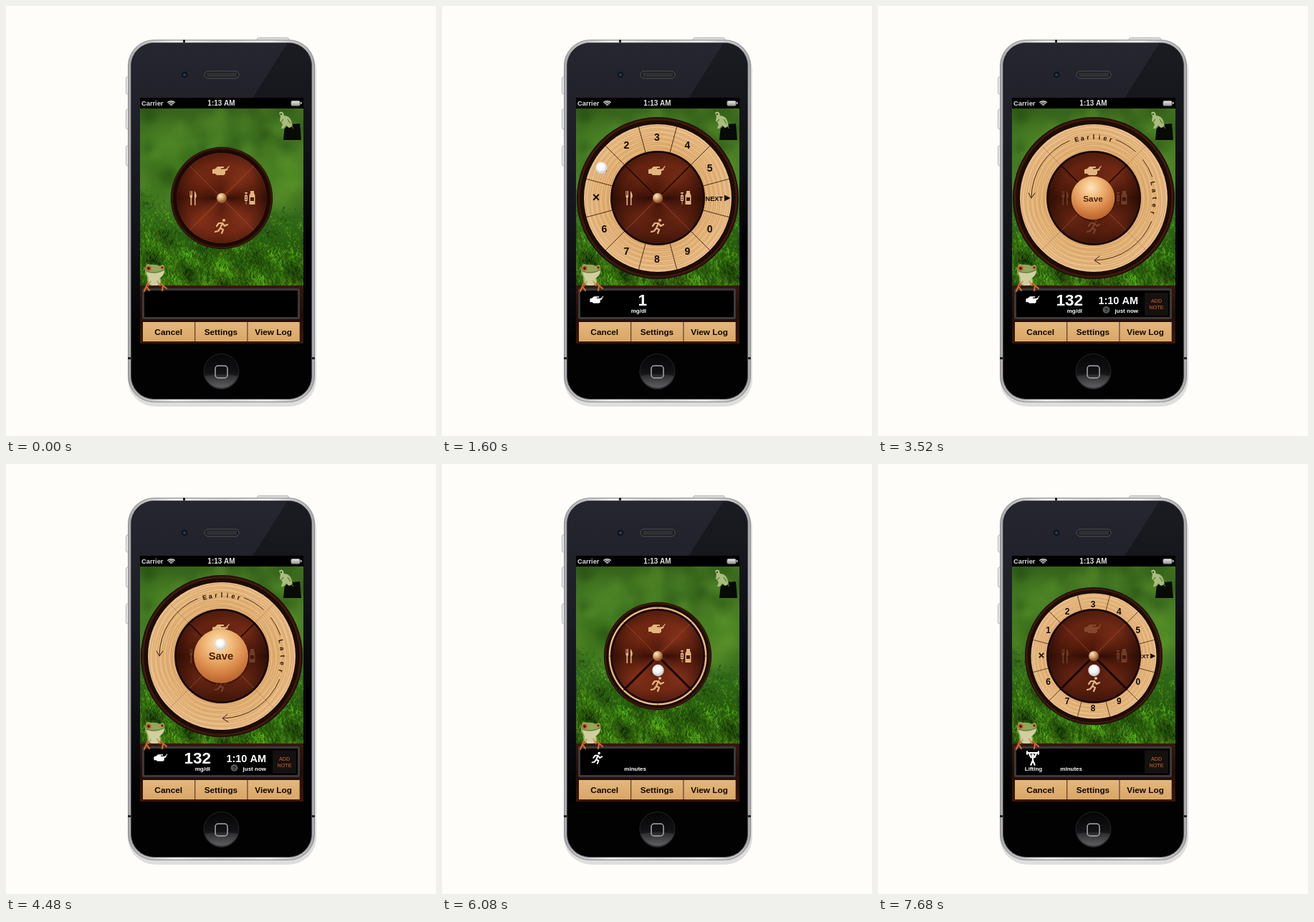
An HTML page with a canvas for the animation above (8 s loop, 600x600 px).

```html
<!DOCTYPE html>
<html lang="en">
<head>
<meta charset="utf-8">
<title>Wheel logger</title>
<style>
html, body { margin: 0; overflow: hidden; background: #fefdf9; }
canvas { display: block; width: 600px; height: 600px; }
</style>
</head>
<body>
<canvas id="stage" width="600" height="600"></canvas>
<script>
const stage = document.getElementById('stage').getContext('2d');
const LOOP = 8000, TAU = Math.PI * 2, CX = 301, CY = 268;
const DISC = 65, WOOD = 103, BARK = 113, CLOSED = 0.63;
const TAN = '#e2b67e';
const rad = deg => deg * Math.PI / 180;
let c = stage;

let seed = 7;
const rnd = (a = 0, b = 1) => {
  seed = (seed * 16807) % 2147483647;
  return a + (b - a) * seed / 2147483647;
};

// Drawing helpers
function gradient(g, stops) {
  stops.forEach((s, i) => g.addColorStop(i / (stops.length - 1), s));
  return g;
}
const linear = (x0, y0, x1, y1, ...stops) => gradient(c.createLinearGradient(x0, y0, x1, y1), stops);
const radial = (x, y, r, ...stops) => gradient(c.createRadialGradient(x, y, 0, x, y, r), stops);
function paint(fill, stroke, width) {
  if (fill) { c.fillStyle = fill; c.fill(); }
  if (stroke) { c.strokeStyle = stroke; c.lineWidth = width; c.stroke(); }
}
function circle(x, y, r, fill, stroke, width = 1) {
  c.beginPath();
  c.arc(x, y, r, 0, TAU);
  paint(fill, stroke, width);
}
function box(x, y, w, h, r, fill, stroke, width = 1) {
  c.beginPath();
  c.roundRect(x, y, w, h, r);
  paint(fill, stroke, width);
}
function shape(d, fill) {
  c.fillStyle = fill;
  c.fill(new Path2D(d), 'evenodd');
}
function line(d, color, width) {
  c.strokeStyle = color;
  c.lineWidth = width;
  c.stroke(new Path2D(d));
}
function text(str, x, y, size, color, align = 'center', weight = 'bold') {
  c.font = `${weight} ${size}px "Liberation Sans", Arial, sans-serif`;
  c.textAlign = align;
  c.fillStyle = color;
  c.fillText(str, x, y);
}
function at(x, y, scale, draw) {
  c.save();
  c.translate(x, y);
  c.scale(scale, scale);
  draw();
  c.restore();
}
function spoke(deg, r0, r1, color, width) {
  const x = Math.cos(rad(deg)), y = Math.sin(rad(deg));
  line(`M${x * r0} ${y * r0}L${x * r1} ${y * r1}`, color, width);
}

// Icons, centred on the origin
const head = (x, y) => `M${x - 1} ${y}a1 1 0 1 1 2 0a1 1 0 1 1-2 0`;
const solid = {
  hand: 'M-12-2L-8-3-5-6H4V-4H0V-2.500H7L11-7 12-6.500 9-2.500 10-1.500 7 0H6V4L4 6H-6L-8 4H-12Z',
  fork: 'M-4.500-10v7q0 2 1 3V10h1.600V0q1-1 1-3v-7h-.8v6h-.7v-6h-.7v6h-.7v-6ZM2-10q3.500 4 2.500 9L3.500 0V10H2Z',
  meds: 'M1-10h5v3l1.500 3V9H-.5V-4L1-7ZM1-1v5h5v-5ZM-7-8h4v1.500h-1.500V-4H-3V4h-1.500v5h-.8V4H-7V-4h1.500v-2.500H-7ZM-6-2v1.200h2V-2ZM-6 1v1.200h2V1Z'
};
const limbs = {
  run: head(4, -8) + 'M2-4L-1 3 3 5 1 10M-1 3L-4 7-8 8M2-4L5 0 9-2M2-4L-3-4-6 0',
  swim: head(2, -2) + 'M-8-1L-2-4 1 2 8 2M-8 4H8',
  bike: head(4, -8) + 'M2-6L-3-3 1 0 0 4M2-5L6-3M-9 4a3 3 0 1 1 6 0a3 3 0 1 1-6 0M3 4a3 3 0 1 1 6 0a3 3 0 1 1-6 0',
  ski: head(2, -8) + 'M1-5L0 2 5 8M0 2L-1 9M-6-6L1-4 6-5',
  lift: head(0, -5) + 'M-9-9H9M-9-11V-7M9-11V-7M-6-9L-3-2H3L6-9M0-2V3L-3 10M0 3L3 10',
  walk: head(1, -8) + 'M0-5L-1 2 4 9M-1 2L-5 9M0-4L5 0M0-4L-4 1',
  golf: head(0, -7) + 'M0-4L1 3 4 9M1 3L-3 9M0-4L-5-2-7-9M0-3L-5-2',
  climb: head(2, -7) + 'M1-4L-1 3 3 9M-1 3L-3 9M1-4L-4-2-6-8M1-3L5 0'
};
const activities = ['ski', 'run', 'lift', 'walk', 'golf', 'climb', 'swim', 'bike'];
function icon(name, x, y, color, scale = 1, width = 2.2) {
  at(x, y, scale, () => {
    c.lineCap = c.lineJoin = 'round';
    if (solid[name]) shape(solid[name], color);
    else line(limbs[name], color, width);
  });
}

// Static scenery
function moss() {
  c.save();
  c.beginPath();
  c.rect(187, 143, 228, 247);
  c.clip();
  c.fillStyle = linear(0, 143, 0, 390, '#35621a', '#447c22', '#457f1f', '#31691a', '#245a0d', '#1f5009');
  c.fillRect(187, 143, 228, 247);
  for (let i = 0; i < 60; i++) {
    const x = rnd(180, 420), y = rnd(140, 280), r = rnd(12, 34);
    const tint = rnd() < 0.5 ? '20,50,8' : '110,165,50';
    circle(x, y, r, radial(x, y, r, `rgba(${tint},.25)`, `rgba(${tint},0)`));
  }
  // Blades run from the far edge of the mound to the front
  const count = 6500;
  for (let i = 0; i < count; i++) {
    const depth = Math.sqrt(i / count), x = rnd(185, 417);
    const y = 246 + (x - 187) * 0.17 + 5 * Math.sin(x / 17) + depth * 145;
    const len = 1.5 + depth * 4;
    const clump = Math.sin(x / 11 + y / 15) + Math.sin(y / 7 - x / 23) + Math.sin(x / 6 - y / 10);
    line(`M${x} ${y}q${rnd(-2, 2)} ${-len / 2} ${rnd(-3, 3)} ${-len}`,
      `hsla(${rnd(86, 102)},${rnd(65, 85)}%,${rnd(14, 38) + clump * 5}%,.75)`, 1);
  }
  c.restore();
}
function perchedFrog() {
  shape('M389 167L397 165 410 164 412 187H387Z', '#080a06');
  shape('M381 149q3-3 6 0l1 4q7 0 10 7l2 8-5 2-4-3-3 4h-4l2-6-4-5 1-6Z', '#a9bd7d');
  line('M387 158l-4 5M392 167l-5 5M398 167l3 4M393 158l4 6', '#55702f', 1.2);
  circle(384, 151, 1.1, '#1b2509');
}
function cornerFrog() {
  line('M199 384L196 391 193 398M196 391L200 397M214 384L219 390 224 394M219 390L218 397', '#d2692e', 2.2);
  shape('M197 378Q192 372 195 364Q196 358 202 361Q210 360 215 363Q220 358 221 365Q223 373 215 379Q219 386 212 390H202Q196 387 197 378Z', '#93a65a');
  shape('M196 371Q208 376 221 369Q220 377 214 380Q217 387 211 390H203Q198 387 199 380Z', '#cfcf9f');
  line('M196 370Q208 375 221 368', '#62733a', 1);
  line('M202 384l-3 6M211 384l4 6', '#cf8d55', 1.6);
  for (const [x, y, r] of [[199, 366, 3.6], [218, 365, 2.2]]) {
    circle(x, y, r, '#cf5424');
    circle(x, y, r / 2.2, '#240a05');
  }
}
function phone() {
  c.fillStyle = '#fefdf9';
  c.fillRect(0, 0, 600, 600);
  box(350.5, 44.5, 44, 6, 2, '#e4e4e4', '#aaa');
  for (const [y, h] of [[99, 24], [144, 28], [195, 28]]) box(167.5, y, 6, h, 2, '#ececec', '#b5b5b5');
  box(170, 52, 263, 507, 38, '#dededd');
  box(170.5, 47.5, 260, 505, 36, linear(170, 0, 431, 0, '#a9a9ab', '#e6e6e7', '#d0d0d2', '#e6e6e7', '#a9a9ab'), '#8c8c90');
  c.fillStyle = '#222';
  c.fillRect(247, 47, 3, 5);
  c.fillRect(170, 490, 5, 3);
  c.fillRect(426, 490, 5, 3);
  box(174.5, 51.5, 252, 497, 32, '#020203', '#45464b');
  c.save();
  c.beginPath();
  c.roundRect(175, 52, 251, 496, 32);
  c.clip();
  shape('M175 52H393L345 128H187V471H175Z', linear(0, 52, 0, 471, '#25262f', '#1d1e26', '#111217', '#000'));
  shape('M393 52H426V300L415 330V128H345Z', linear(0, 52, 0, 330, '#1b1c22', '#121317', '#020203'));
  c.restore();
  circle(249, 96, 5, '#10131a', '#25282f');
  circle(249, 96, 2, '#24405f');
  box(277, 91, 48, 10, 5, '#19191c', '#55565b');
  for (let x = 281; x < 323; x += 2) line(`M${x} 93V99`, '#55565a', 0.8);
  circle(300.5, 510, 24.5, linear(0, 485, 0, 535, '#050506', '#111113', '#3c3c3f'), '#252528');
  shape('M277 516Q300 512 324 516A25 25 0 0 1 277 516Z', linear(0, 513, 0, 535, 'rgba(150,150,152,.12)', 'rgba(170,170,172,.38)'));
  box(292, 502, 17, 17, 4, null, '#a9a9ac', 1.5);

  c.fillStyle = '#000';
  c.fillRect(187, 128, 228, 344);
  text('Carrier', 189, 139, 9.3, '#ddd', 'left');
  text('1:13 AM', 300.5, 139, 10, '#ddd');
  for (const r of [2.5, 5, 7.3]) {
    c.beginPath();
    c.arc(230.5, 140, r, rad(-135), rad(-45));
    paint(null, '#ddd', 1.5);
  }
  box(398, 132.5, 12, 6.5, 1.5, linear(0, 132, 0, 139, '#eee', '#999'), '#999');
  c.fillRect(411, 134, 1.5, 3);
  moss();
  perchedFrog();

  c.fillStyle = linear(0, 390, 0, 471, '#3a170c', '#240d06', '#3a170c');
  c.fillRect(187, 390, 228, 81);
  box(191.5, 395.5, 217, 40, 1, '#000', '#393a3b', 3);
  ['Cancel', 'Settings', 'View Log'].forEach((label, i) => {
    const x = 191 + i * 73.2;
    c.fillStyle = linear(0, 441, 0, 468, '#e6bb80', '#dcaa69');
    c.fillRect(x, 441, 72.3, 27);
    for (let y = 443; y < 468; y += 2.5) line(`M${x} ${y}q36 ${rnd(-1, 1)} 72 0`, 'rgba(165,105,45,.18)', 0.7);
    text(label, x + 35.7, 459, 11.8, '#100804');
  });
}

// The wheel
function woodBase() {
  circle(0, 0, BARK, '#1e0b05');
  circle(0, 0, BARK - 3, null, '#3c1a0c', 3);
  circle(0, 0, WOOD + 1, '#160703');
  circle(0, 0, WOOD, radial(0, 0, WOOD, '#d9a261', '#dfaa6a', '#e4b478', '#eac08a'));
  for (let r = 52; r < WOOD; r += 3.2) {
    c.beginPath();
    for (let a = 0; a <= 360; a += 5) {
      const q = r + Math.sin(rad(a * 3) + r) * 0.8 + Math.sin(rad(a * 7)) * 0.5;
      c.lineTo(q * Math.cos(rad(a)), q * Math.sin(rad(a)));
    }
    paint(null, 'rgba(176,108,47,.38)', 0.9);
  }
}
function numberRing() {
  const labels = ['', '0', '9', '8', '7', '6', '×', '1', '2', '3', '4', '5'];
  labels.forEach((label, i) => {
    spoke(i * 30 + 15, 50, WOOD, '#40200d', 0.9);
    const a = rad(i * 30);
    text(label, 85 * Math.cos(a) - 1, 85 * Math.sin(a) + 5, label === '×' ? 18 : 14, '#130a04');
  });
  text('NEXT', 66.5, 3.5, 9.2, '#130a04', 'left');
  shape('M93-4.500L101.500 0 93 4.500Z', '#130a04');
}
function activityRing(chosen) {
  if (chosen) {
    c.beginPath();
    c.moveTo(0, 0);
    c.arc(0, 0, WOOD, rad(45), rad(90));
    paint('rgba(110,55,15,.4)');
  }
  activities.forEach((name, i) => {
    spoke(i * 45, 50, WOOD, '#40200d', 0.9);
    const a = rad(i * 45 + 22.5);
    icon(name, 86 * Math.cos(a) - 1, 86 * Math.sin(a), '#2a1508', 0.9, 2);
  });
}
function arcText(str, centre, step) {
  [...str].forEach((ch, i) => {
    c.save();
    c.rotate(rad(centre + (i - (str.length - 1) / 2) * step + 90));
    text(ch, 0, -82, 9, '#251006');
    c.restore();
  });
}
function timeRing() {
  for (const a of [45, 135, 225, 315]) spoke(a, 50, WOOD, 'rgba(120,65,25,.45)', 0.7);
  arcText('Earlier', -90, 5.4);
  arcText('Later', 0, 7);
  for (const [from, to] of [[-180, -113], [-69, -48], [-38, -20], [22, 89]]) {
    c.beginPath();
    c.arc(0, 0, 87, rad(from), rad(to));
    paint(null, '#3a1b0b', 0.9);
  }
  line('M-91-7L-87 0-82-7M8 81L1 87 9 92', '#3a1b0b', 1);
}
function disc({ scale, pick, dim, ball = 0 }) {
  circle(0, 0, DISC + 1, '#1c0804');
  circle(0, 0, DISC - 2, radial(0, 0, DISC, '#3f1207', '#52190a', '#6c2510', '#6a2410', '#3e1408'));
  const sheen = c.createConicGradient(rad(-90), 0, 0);
  const [lit, soft, shade] = ['rgba(200,85,50,.32)', 'rgba(165,65,35,.22)', 'rgba(20,3,0,.3)'];
  circle(0, 0, DISC - 2, gradient(sheen, [soft, lit, shade, lit, soft, lit, shade, soft, soft]));
  for (let r = 8; r < DISC - 2; r += 2.5) circle(0, 0, r, null, 'rgba(25,4,0,.3)', 0.8);
  if (scale > 0.75) circle(0, 0, DISC - 2, linear(0, -DISC, 0, DISC, 'rgba(25,5,0,.05)', 'rgba(25,5,0,.35)'));
  for (const a of [45, 135, 225, 315]) spoke(a, 8, DISC - 2, 'rgba(185,90,55,.7)', 0.8);
  if (pick) {
    const bottom = pick === 'run';
    for (const a of bottom ? [45, 135] : [225, 315]) spoke(a, 8, DISC, '#1b0602', bottom ? 3 : 1.5);
  }
  for (const [name, x, y] of [['hand', -1, -38], ['meds', 39, 0], ['run', -1, 39], ['fork', -40, 0]]) {
    c.globalAlpha = (dim && name !== pick) ? 0.25 : 1;
    icon(name, x, y, TAN);
  }
  c.globalAlpha = 1;
  circle(0, 0, 7, radial(-2, -3, 9, '#f8e6c6', '#d5a872', '#94592b'));
  if (ball) {
    circle(-1, 1, 39 * ball, 'rgba(25,6,0,.5)');
    circle(-1, 0, 38 * ball, radial(-4, -18 * ball, 56 * ball, '#ffe5bd', '#f0b878', '#dc8c4c', '#b9612c'));
    text('Save', -1, 5, 14.8 * ball, '#4a200e');
  }
}
function wheel(s) {
  at(CX, CY, s.scale, () => {
    woodBase();
    if (s.ring === 'numbers') numberRing();
    else if (s.ring === 'activities') activityRing(s.chosen);
    else if (s.ring === 'time') timeRing();
    if (s.pick === 'run' && s.ring !== 'numbers') {
      for (const a of [45, 135]) spoke(a, 50, WOOD, '#1b0602', s.chosen && a === 45 ? 4 : 1.5);
    }
  });
  at(CX, CY, 1, () => disc(s));
}

function display({ pick, value = '', clock, note, label }) {
  if (pick) {
    icon(label ? 'lift' : pick, 216, label ? 411 : 410, '#fff', label ? 0.88 : 0.8, 2.5);
    text(pick === 'hand' ? 'mg/dl' : 'minutes', 285, 427.5, 8, '#fff', 'right');
  }
  if (label) text('Lifting', 217, 427.5, 8, '#fff');
  text(value, 286, 418, 22.5, '#fff', 'right');
  if (clock) {
    text(clock, 363, 415.5, 14.5, '#fff', 'right');
    text('just now', 363, 427.5, 8, '#fff', 'right');
    circle(318.5, 424, 5, '#555');
    text('?', 318.5, 427, 8, '#111');
  }
  if (note) {
    box(372, 400, 33, 32, 1, '#15110f');
    text('ADD', 388.5, 413.5, 7.2, '#d8682c', 'center', 'normal');
    text('NOTE', 388.5, 422.7, 7.2, '#d8682c', 'center', 'normal');
  }
}

// Each step starts at its time and holds until the next one
const idle = { scale: CLOSED };
const glucose = { pick: 'hand', ring: 'numbers', scale: 1 };
const timing = { ...glucose, ring: 'time', value: '132', clock: '1:10 AM', note: true, dim: true };
const sport = { pick: 'run', ring: 'activities', dot: [301.5, 288] };
const top3 = [300, 210];
const steps = [
  [0, idle],
  [640, { ...glucose, scale: CLOSED, dot: top3 }],
  [960, { ...glucose, scale: 0.83, dot: top3 }],
  [1280, { ...glucose, dot: top3 }],
  [1600, { ...glucose, value: '1', dot: [222.5, 226] }],
  [1920, { ...glucose, value: '13', dot: [300, 172] }],
  [2240, { ...glucose, value: '132', dot: [248.5, 180] }],
  [2560, { ...glucose, value: '132' }],
  [2880, { ...glucose, value: '132', dot: [393.5, 280.5] }],
  [3200, { ...timing, ball: 0.4 }],
  [3520, { ...timing, ball: 0.8 }],
  [3840, { ...timing, ball: 1 }],
  [4480, { ...timing, ball: 1, dot: [299.5, 251.5] }],
  [4800, { scale: 0.76 }],
  [5120, idle],
  [5760, { ...idle, dot: [301.5, 289] }],
  [6080, { ...sport, scale: 0.665 }],
  [6400, { ...sport, scale: 0.92 }],
  [7040, { ...sport, scale: 0.85, chosen: true, note: true }],
  [7360, { ...sport, scale: 0.7, ring: 'numbers', label: true, note: true, dim: true }],
  [7680, { ...sport, scale: 0.85, ring: 'numbers', label: true, note: true, dim: true }]
];

const scenery = document.createElement('canvas');
scenery.width = scenery.height = 600;
c = scenery.getContext('2d');
phone();
c = stage;

let shown;
function frame() {
  const t = performance.now() % LOOP;
  const [, step] = steps.findLast(([start]) => start <= t);
  if (step !== shown) {
    shown = step;
    c.drawImage(scenery, 0, 0);
    wheel(step);
    c.lineCap = c.lineJoin = 'round';
    cornerFrog();
    display(step);
    if (step.dot) {
      const [x, y] = step.dot;
      circle(x, y, 8.2, radial(x - 1, y - 2, 9, '#fff', '#fafafa', '#cfcfcf'));
    }
  }
  requestAnimationFrame(frame);
}
frame();
</script>
</body>
</html>
```
